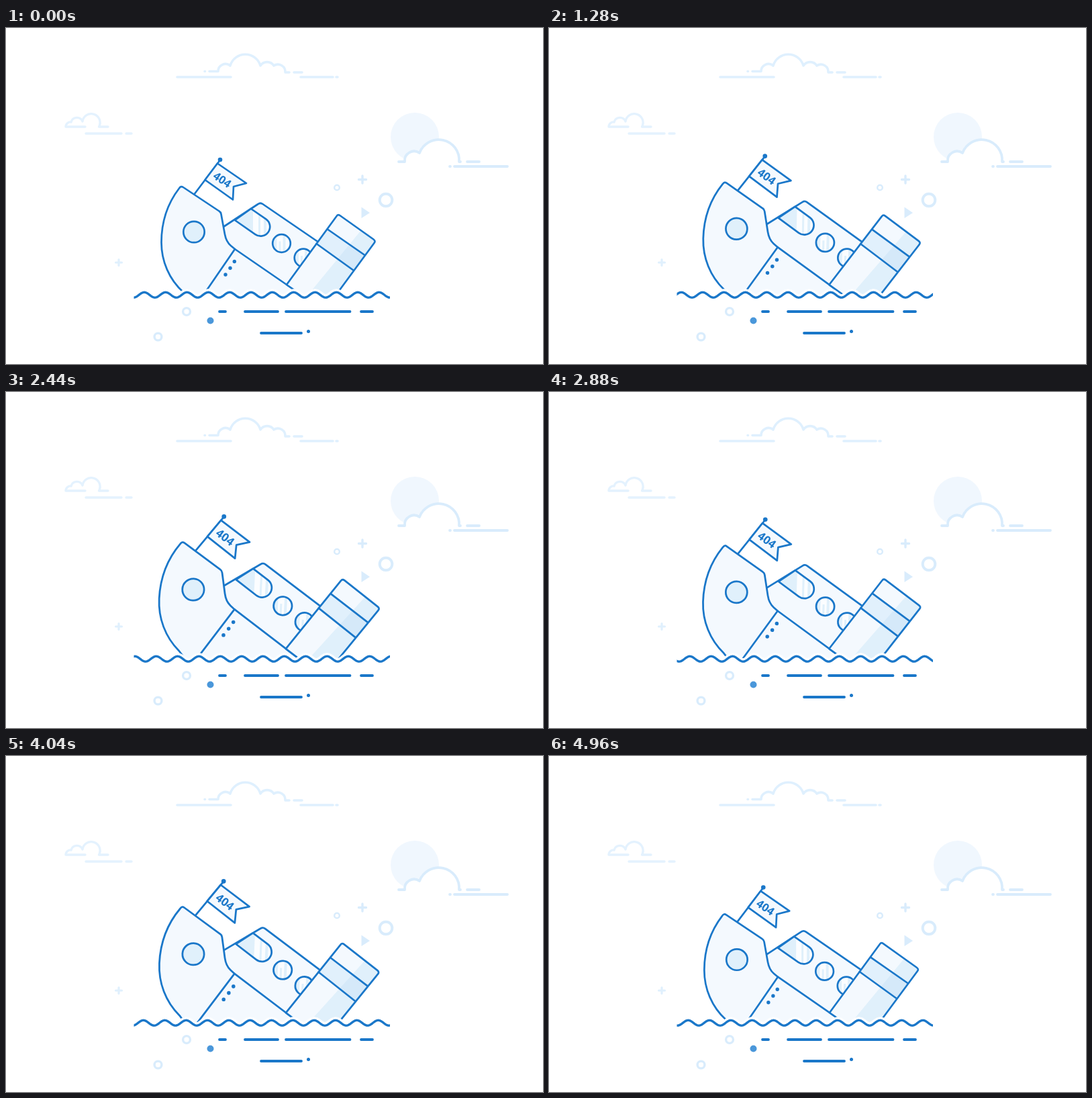
Recreate the animation shown at these times as an HTML page with a canvas. Size 800 by 500 pixels, loop 5000 ms.

```html
<!DOCTYPE html>
<html lang="en">
<head>
<meta charset="utf-8">
<title>404</title>
<style>
html, body { margin: 0; width: 100%; height: 100%; overflow: hidden; background: #fff; }
canvas { display: block; width: 800px; height: 500px; }
</style>
</head>
<body>
<canvas id="stage" width="800" height="500"></canvas>
<script>
const ctx = document.getElementById('stage').getContext('2d');
const LOOP = 5000, STEP = 40;
const BLUE = '#1a77c9', HULL = '#f4f9fe', PALE = '#e0f0fb', MIST = '#d9ecfc';
const WAVE = { left: 190.5, right: 572, y: 397.2, amp: 3.9, length: 31.8, crest: 206 };
const PIVOT = { x: 427, y: 365 };

function fill(d, color) {
  ctx.fillStyle = color;
  ctx.fill(new Path2D(d));
}

function stroke(d, color = BLUE, width = 2.7) {
  ctx.strokeStyle = color;
  ctx.lineWidth = width;
  ctx.stroke(new Path2D(d));
}

function dot(x, y, r, color) {
  ctx.beginPath();
  ctx.arc(x, y, r, 0, Math.PI * 2);
  ctx.fillStyle = color;
  ctx.fill();
}

function ring(x, y, r, color, width) {
  ctx.beginPath();
  ctx.arc(x, y, r, 0, Math.PI * 2);
  ctx.strokeStyle = color;
  ctx.lineWidth = width;
  ctx.stroke();
}

function clipped(d, draw) {
  ctx.save();
  ctx.clip(new Path2D(d));
  draw();
  ctx.restore();
}

function plus(x, y, r, color, width) {
  stroke(`M${x - r} ${y}h${2 * r}M${x} ${y - r}v${2 * r}`, color, width);
}

function drawSky() {
  const high = '#dff0fe', left = '#e4f2fe';
  stroke('M303 64.5H316A11 11 0 0 1 334 56A23.5 23.5 0 0 1 379 56A12 12 0 0 1 399 56A11 11 0 0 1 416 66H422M429 66H441', high, 3.6);
  stroke('M255 73H335M439 73H487M492 73H494M296 64.5H296.5', high, 3.6);

  stroke('M118 147H89A7 7 0 0 1 97 140A9 9 0 0 1 114 139A13.1 13.1 0 1 1 138.5 147H152M119 157H172M179 157H187', left, 3.4);

  dot(609, 162, 36, '#f0f7fe');
  const cloud = 'M594 199A14 14 0 0 1 616 186A30.5 30.5 0 0 1 675 199';
  fill(cloud + 'Z', '#fff');
  stroke(cloud + 'H677M585 199H594M687 199H705M668 206H747M661 206H662', MIST, 3.8);

  ring(493, 237.5, 3.8, MIST, 2.5);
  ring(566, 256, 9.3, MIST, 4);
  plus(531, 225.5, 5.5, MIST, 3.4);
  plus(168, 349, 4.5, '#e0f0fd', 3.2);
  fill('M529.5 266.5L542 275L529.5 283Z', MIST);
}

function drawFlag() {
  const flag = 'M315 201.5L358 231L339 236L338 255.5L296.5 226Z';
  stroke('M318.5 197L280 248');
  fill(flag, HULL);
  stroke(flag);
  dot(319, 196, 3.3, BLUE);
  ctx.save();
  ctx.translate(322.3, 225.8);
  ctx.rotate(0.6);
  ctx.font = 'bold 16.5px "Open Sans", sans-serif';
  ctx.textAlign = 'center';
  ctx.textBaseline = 'alphabetic';
  ctx.fillStyle = BLUE;
  ctx.fillText('404', 0, 5.9);
  ctx.restore();
}

function drawCabin() {
  const cabin = 'M323 296.5L375.5 262Q379 259.5 382.5 262L466 319L430 390L341 329L326 308Z';
  fill(cabin, HULL);
  stroke('M323 296.5L375.5 262Q379 259.5 382.5 262L466 319');

  const pane = 'M341 286L365 269L387.3 284.3A13.9 13.9 0 0 1 371.3 307.1Z';
  fill(pane, '#fbfdff');
  clipped(pane, () => {
    fill('M335 260H368V315H335Z', PALE);
    fill('M376 260H379V315H376ZM384 260H388V315H384Z', PALE);
  });
  stroke(pane);

  for (const [x, y] of [[410.5, 320.5], [443, 342]]) {
    dot(x, y, 13.3, '#fbfdff');
    clipped(`M${x - 13} ${y}a13 13 0 0 1 26 0a13 13 0 0 1 -26 0Z`, () => {
      fill(`M${x - 13} ${y - 13}h6v26h-6ZM${x - 4} ${y - 3}h3v16h-3ZM${x + 2} ${y - 13}h4v26h-4Z`, PALE);
    });
    ring(x, y, 13.3, BLUE, 2.7);
  }
}

function drawStack() {
  const stack = 'M418 382L492.5 280Q494.5 277 497.5 279L547.5 314.5Q551 317 548.5 320L480 413L440 397Z';
  const band = 'M479 299.5L534.5 338L517.5 360.5L462.5 321Z';
  fill(stack, HULL);
  clipped(stack, () => {
    const shade = 'M529 301L455 391L450 420H560V300Z';
    fill(shade, PALE);
    fill(band, '#e1f0fc');
    clipped(band, () => fill(shade, '#d5e9f9'));
  });
  stroke(stack);
  stroke('M479 299.5L534.5 338M462.5 321L517.5 360.5');
}

function drawHull() {
  fill('M341 329L440 397V412H285Z', HULL);
  const bow = 'M280 412L264 393C243 374 231.5 347 231.5 319C231.5 290 240 262 258 238.5Q260.5 234.5 264 237L317.5 272.5Q320 274 320.5 277L326 307Q328 318 335 324L341 329L284 412';
  fill(bow + 'Z', HULL);
  stroke(bow);
  stroke('M341 329L440 397');
  dot(280, 303.5, 15.7, PALE);
  ring(280, 303.5, 15.7, BLUE, 2.7);
  for (const [x, y] of [[340.3, 347.5], [334, 357.3], [327, 367]]) dot(x, y, 2.7, BLUE);
}

// Sways linearly from rest to full tilt and back, three times per loop.
function drawShip(t) {
  const phase = (t * 3 / LOOP) % 1;
  const sway = 1 - Math.abs(1 - 2 * phase);
  ctx.save();
  ctx.translate(PIVOT.x, PIVOT.y);
  ctx.rotate(0.055 * sway);
  ctx.scale(1 + 0.033 * sway, 1 + 0.033 * sway);
  ctx.translate(-PIVOT.x, -PIVOT.y);
  drawFlag();
  drawCabin();
  drawHull();
  drawStack();
  ctx.restore();
}

function drawWave(t) {
  const crest = WAVE.crest - WAVE.length * t / 1000;
  const line = new Path2D();
  for (let x = WAVE.left - 10; x <= WAVE.right + 10; x++) {
    line.lineTo(x, WAVE.y - WAVE.amp * Math.cos((x - crest) / WAVE.length * Math.PI * 2));
  }
  const water = new Path2D(line);
  water.lineTo(WAVE.right + 10, 500);
  water.lineTo(WAVE.left - 10, 500);
  ctx.save();
  ctx.beginPath();
  ctx.rect(WAVE.left, 380, WAVE.right - WAVE.left, 120);
  ctx.clip();
  ctx.fillStyle = ctx.strokeStyle = '#fff';
  ctx.fill(water);
  ctx.lineWidth = 10;
  ctx.stroke(line);
  ctx.strokeStyle = BLUE;
  ctx.lineWidth = 3.4;
  ctx.stroke(line);
  ctx.restore();
}

function drawWater() {
  stroke('M318 422H327M356 422H405M417 422H512.5M529 422H546M380 454H440', BLUE, 3.8);
  dot(450.5, 451.5, 2.5, BLUE);
  dot(304.5, 435.5, 5, '#4a97da');
  ring(269, 422, 5.4, MIST, 3.4);
  ring(226.5, 459.5, 5.4, MIST, 3.4);
}

function frame() {
  const t = Math.floor(performance.now() % LOOP / STEP) * STEP;
  ctx.fillStyle = '#fff';
  ctx.fillRect(0, 0, 800, 500);
  ctx.lineCap = ctx.lineJoin = 'round';
  drawSky();
  drawShip(t);
  drawWave(t);
  drawWater();
  requestAnimationFrame(frame);
}
frame();
</script>
</body>
</html>
```
